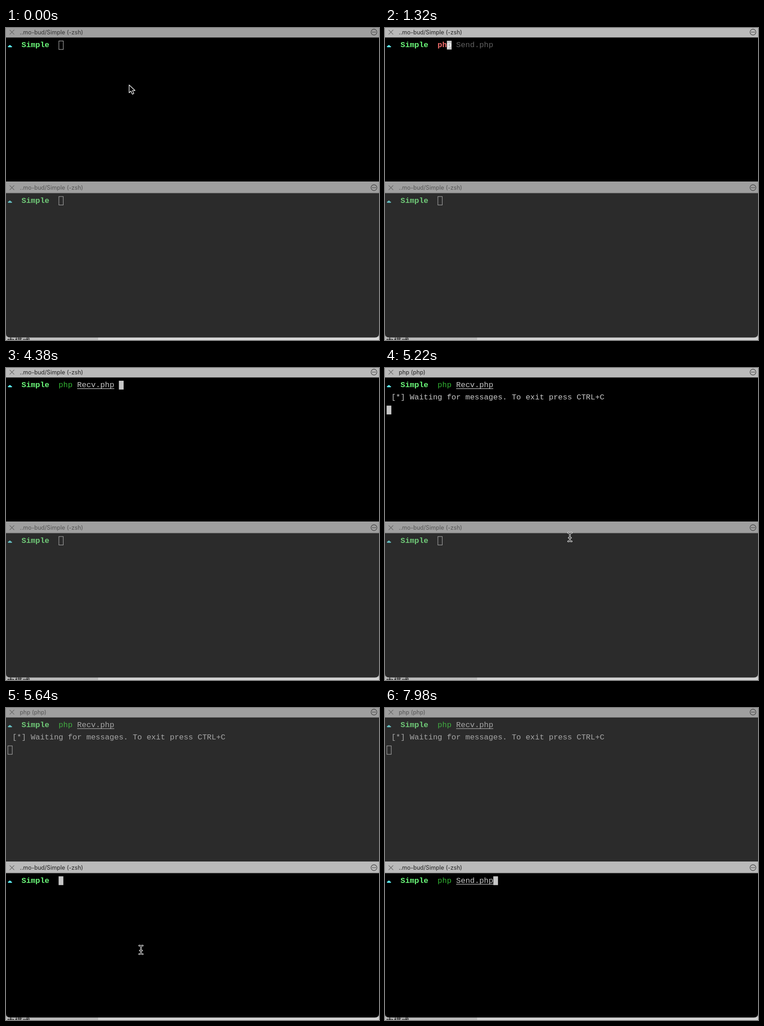
Recreate the animation shown at these times as an HTML page. Size 818x685 px, loop 8 s.

```html
<!DOCTYPE html>
<html lang="en">
<head>
<meta charset="utf-8">
<title>Split terminal</title>
<style>
  html, body { margin: 0; width: 100%; height: 100%; overflow: hidden; background: #c4c4c4; }
  svg { display: block; width: 818px; height: 685px; }
  text { white-space: pre; }
  .mono { font: 16.95px "Liberation Mono", "DejaVu Sans Mono", monospace; }
  .bold { font-weight: 700; }
  .title { font: 12.6px Inter, Roboto, sans-serif; }
  .cjk { font: 17px "Noto Sans CJK SC", "Noto Sans CJK", sans-serif; }
</style>
</head>
<body>
<svg id="stage" viewBox="0 0 818 685" xmlns="http://www.w3.org/2000/svg">
  <defs>
    <linearGradient id="shade" x1="0" x2="0" y1="0" y2="1">
      <stop offset="0" stop-opacity=".16"/><stop offset="1" stop-opacity=".03"/>
    </linearGradient>
    <clipPath id="window"><path d="M0 0H818V671Q818 679.5 809 679.5H9Q0 679.5 0 671Z"/></clipPath>
  </defs>
  <rect width="818" height="685" fill="#dedede"/>
  <rect y="670" width="202" height="15" fill="#c6c6c6"/>
  <text class="cjk" x="2" y="693.5" fill="#111">中模式</text>
  <rect id="shadow" y="670" width="818" height="15" fill="url(#shade)"/>
  <g clip-path="url(#window)"><g id="upper"></g><g id="lower"></g></g>
  <g id="pointer"></g>
</svg>
<script>
const LOOP = 8000, STEP = 60;
const CELL = 10.17, LEFT = 3.5, BASE = 42, LINE = 27.3;
const COMMAND_COL = 11, SPLIT = 341.5;
const SHELL = '..mo-bud/Simple (-zsh)';
const WAITING = ' [*] Waiting for messages. To exit press CTRL+C';

const LIT = { bg: '#000', cloud: '#5ff4fa', prompt: '#6bf97a', valid: '#31b432', wrong: '#ef6d6b',
  text: '#c7c7c7', hint: '#606060', box: '#c7c7c7' };
const DIM = { ...LIT, bg: '#2b2b2b', cloud: '#66bfc2', prompt: '#70ca78', valid: '#40ae41',
  text: '#a6a6a6', box: '#b5b5b5' };

// Each entry: start time, typed text, suggested remainder, command recognised.
const UPPER = [
  [0, '', ''],
  [1140, 'p', ''],
  [1200, 'p', 'hp Send.php'],
  [1320, 'ph', 'p Send.php'],
  [1560, 'php', ' Send.php'],
  [1620, 'php', ' Send.php', true],
  [1800, 'php ', 'Send.php', true],
  [3000, 'php R', 'ecv.php', true],
  [3360, 'php Re', 'cv.php', true],
  [3780, 'php Recv.php ', '', true]
];
const LOWER = [
  [0, '', ''],
  [6180, 'p', ''],
  [6240, 'p', 'hp Send.php'],
  [6360, 'ph', 'p Send.php'],
  [6480, 'php', ' Send.php'],
  [6540, 'php', ' Send.php', true],
  [6720, 'php ', 'Send.php', true],
  [7620, 'php Send.php', '', true]
];

const $ = id => document.getElementById(id);
const latest = (list, t) => list.filter(entry => entry[0] <= t).pop();
const colX = col => LEFT + col * CELL;
const rowY = row => BASE + row * LINE;

function mono(str, col, row, fill, bold) {
  return str && `<text class="mono ${bold ? 'bold' : ''}" x="${colX(col)}" y="${rowY(row)}" fill="${fill}">${str}</text>`;
}

function block(col, row, solid, color) {
  const x = colX(col), y = rowY(row) - 14;
  return solid
    ? `<rect x="${x}" y="${y}" width="10.4" height="19.3" fill="${color}"/>`
    : `<rect x="${x + .6}" y="${y + .5}" width="9.6" height="18.6" fill="none" stroke="${color}"/>`;
}

function header(title, active, titleColor) {
  return `<rect y="-4.5" width="818" height="25.5" fill="${active ? '#bababa' : '#9f9f9f'}"/>
    <path d="M0 20.6H818" stroke="#777" stroke-width=".8"/>
    <path d="M8 4.2L18 14.2M18 4.2L8 14.2" stroke="#626262" stroke-width="1.2"/>
    <text class="title" x="30.3" y="13.6" fill="${titleColor}">${title}</text>
    <g fill="#3c3c3c"><circle cx="807" cy="9" r="6.4" fill="none" stroke="#3c3c3c" stroke-width="1.1"/>
    <circle cx="804" cy="9" r="1"/><circle cx="807" cy="9" r="1"/><circle cx="810" cy="9" r="1"/></g>`;
}

function commandLine([, typed, hint, valid], colors) {
  const [command, arg] = typed.split(' ');
  const argCol = COMMAND_COL + 4;
  const rule = arg
    ? `<path d="M${colX(argCol)} 45.4h${arg.length * CELL}" stroke="${colors.text}" stroke-width="1.2"/>` : '';
  return `<path d="M5.5 42.2Q3.9 42 4.1 40.5Q4.6 39.3 6 39.5Q6.5 37.3 8.6 37.4Q10.6 37.4 11 39.4
      Q13.4 39.4 13.4 41Q13.3 42.2 12 42.2Z" fill="${colors.cloud}"/>` +
    mono('Simple', 3, 0, colors.prompt, true) +
    mono(command, COMMAND_COL, 0, valid ? colors.valid : colors.wrong, !valid) +
    mono(arg || '', argCol, 0, colors.text) + rule +
    mono(hint, COMMAND_COL + typed.length, 0, colors.hint);
}

function pane({ offset, title, active, titleColor, colors, line, solid, row = 0, message = '' }) {
  const col = row ? 0 : COMMAND_COL + line[1].length;
  const covered = row ? '' : mono(line[2].slice(0, 1), col, 0, '#fff');
  return `<g transform="translate(0 ${offset})">
    <rect y="-4.5" width="818" height="${SPLIT + 5}" fill="${colors.bg}"/>
    ${header(title, active, titleColor)}${commandLine(line, colors)}${mono(message, 0, 1, colors.text)}
    ${block(col, row, solid, colors.box)}${covered}</g>`;
}

function arrow(x, y) {
  return `<path transform="translate(${x} ${y})" d="M0 0V17.2L4 13.5L7 20.3L10.3 18.8L7.3 12.3H13Z"
    fill="#000" stroke="#fff" stroke-width="1.3" stroke-linejoin="round"/>`;
}

function beam(x, y) {
  const d = 'M-4-9.3Q0-9.3 0-6.5Q0-9.3 4-9.3M0-6.5V6.5M-4 9.3Q0 9.3 0 6.5Q0 9.3 4 9.3M-2.5 1.5H2.5';
  const stroke = (color, width) => `<path d="${d}" stroke="${color}" stroke-width="${width}"/>`;
  return `<g transform="translate(${x} ${y})" fill="none" stroke-linecap="round">${stroke('#fff', 3.2)}${stroke('#111', 1.2)}</g>`;
}

const ease = u => u * u * (3 - 2 * u);
const progress = (t, from, to) => ease(Math.min(1, Math.max(0, (t - from) / (to - from))));
const bend = (a, b, c, u) => a * (1 - u) ** 2 + 2 * b * u * (1 - u) + c * u * u;

function pointer(t) {
  if (t < 180) return arrow(270, 125);
  if (t < 1140) {
    const u = progress(t, 120, 420);
    return beam(275 + 99 * u, 134 - 15 * u);
  }
  if (t < 5040 || t >= 6180) return '';
  const u = progress(t, 4980, 5400);
  return beam(bend(374, 500, 296, u), bend(119, 330, 531, u));
}

function draw(time) {
  const t = Math.floor(time / STEP) * STEP;
  const focused = t >= 180, switched = t >= 5580, swapped = t >= 5640;
  const running = t >= 4620;

  $('upper').innerHTML = pane({
    offset: 0,
    title: t >= 4500 ? 'php (php)' : SHELL,
    active: focused && !switched,
    titleColor: switched ? '#555' : focused ? '#222' : '#333',
    colors: swapped ? DIM : LIT,
    line: latest(UPPER, t),
    solid: focused && !swapped,
    row: running ? 2 : t >= 4440 ? 1 : 0,
    message: running ? WAITING : ''
  });
  $('lower').innerHTML = pane({
    offset: SPLIT,
    title: SHELL,
    active: switched,
    titleColor: switched ? '#222' : '#555',
    colors: swapped ? LIT : DIM,
    line: latest(LOWER, t),
    solid: swapped
  });
  $('shadow').setAttribute('opacity', focused ? 1 : .5);
  $('pointer').innerHTML = pointer(t);
}

const start = performance.now();
function tick() {
  draw((performance.now() - start) % LOOP);
  requestAnimationFrame(tick);
}
tick();
</script>
</body>
</html>
```
